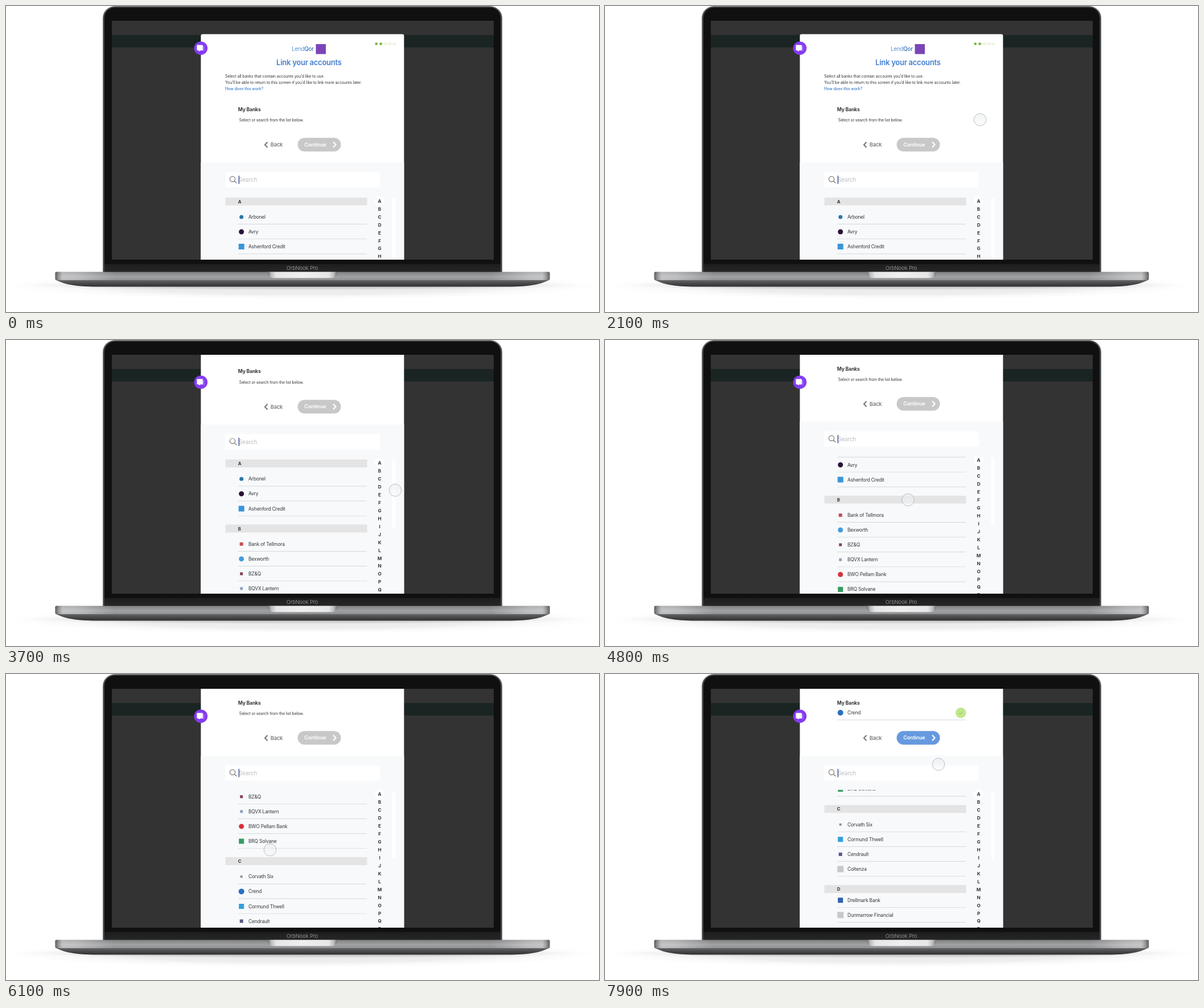
Animation of 1042 by 538 pixels, one loop 8000 ms. Source, as an HTML page with a canvas:

```html
<!DOCTYPE html>
<html lang="en">
<head>
<meta charset="utf-8">
<title>Link your accounts</title>
<style>
  html, body { margin: 0; width: 100%; height: 100%; overflow: hidden; background: #fff; }
  canvas { display: block; width: 1042px; height: 538px; }
</style>
</head>
<body>
<canvas id="stage"></canvas>
<script>
const W = 1042, H = 538, LOOP = 8000, STEP = 100;
const canvas = document.getElementById('stage');
const ctx = canvas.getContext('2d');
const dpr = window.devicePixelRatio || 1;
canvas.width = W * dpr;
canvas.height = H * dpr;

const INK = '#333639';
const ROW = 26.1;
const TRACKING = -0.02;
const PICKED = 'Crend';
const PICK_TIME = 7100;

// Each bank: name, icon colour, icon shape, icon size
const sections = [
  { letter: 'A', gap: 27.3, banks: [
    ['Arbonel', '#2b78a8', 'circle', 7],
    ['Avry', '#2a1238', 'circle', 9],
    ['Ashenford Credit', '#3a96d8', 'square', 10]] },
  { letter: 'B', gap: 27.3, banks: [
    ['Bank of Tellmora', '#c4505a', 'square', 6],
    ['Bexworth', '#3f9fdc', 'circle', 9],
    ['BZ&Q', '#85404f', 'square', 5],
    ['BQVX Lantern', '#93a4bb', 'square', 5],
    ['BWO Pellam Bank', '#d8323a', 'circle', 9],
    ['BRQ Solvane', '#379c62', 'square', 9]] },
  { letter: 'C', gap: 27.3, banks: [
    ['Corvath Six', '#8b9095', 'square', 4],
    [PICKED, '#2a70c0', 'circle', 10],
    ['Cormund Thwell', '#349fdc', 'square', 9],
    ['Cendrault', '#555a88', 'square', 6],
    ['Coltenza', '#c6c8ca', 'square', 11]] },
  { letter: 'D', gap: 19.7, banks: [
    ['Drellmark Bank', '#2d63b0', 'square', 9],
    ['Dunmarrow Financial', '#c6c8ca', 'square', 11]] }
];
const pickedBank = sections[2].banks[1];

const clamp = v => Math.max(0, Math.min(1, v));

// Smooth curve through [time, value] points, without overshoot
function track(keys, t) {
  const last = keys.length - 1;
  if (t <= keys[0][0]) return keys[0][1];
  if (t >= keys[last][0]) return keys[last][1];
  const slope = i => (keys[i + 1][1] - keys[i][1]) / (keys[i + 1][0] - keys[i][0]);
  const tangent = i => {
    if (i === 0 || i === last) return 0;
    const a = slope(i - 1), b = slope(i);
    return a * b <= 0 ? 0 : 2 * a * b / (a + b);
  };
  let i = 0;
  while (t >= keys[i + 1][0]) i++;
  const span = keys[i + 1][0] - keys[i][0];
  const u = (t - keys[i][0]) / span, u2 = u * u, u3 = u2 * u;
  return (2 * u3 - 3 * u2 + 1) * keys[i][1] + (u3 - 2 * u2 + u) * span * tangent(i)
    + (3 * u2 - 2 * u3) * keys[i + 1][1] + (u3 - u2) * span * tangent(i + 1);
}

const pageScroll = t => 131.5 * (1 - Math.cos(Math.PI * clamp((t - 2140) / 1780))) / 2;
const listKeys = [[4200, 0], [4800, 46], [6100, 190.4], [6900, 282]];
const pointerX = [[2100, 659], [3100, 675.3], [3700, 684], [4000, 646], [4800, 532.5], [6100, 464], [6900, 440], [7100, 440], [7900, 586]];
const pointerY = [[2100, 199.8], [3100, 221.3], [3700, 264], [4000, 271], [4800, 281], [6100, 309], [6900, 291], [7100, 291], [7900, 158.8]];

function rect(x, y, w, h, fill, r = 0) {
  ctx.fillStyle = fill;
  ctx.beginPath();
  ctx.roundRect(x, y, w, h, r);
  ctx.fill();
}

function circle(x, y, r, fill, stroke, width = 1) {
  ctx.beginPath();
  ctx.arc(x, y, r, 0, Math.PI * 2);
  if (fill) { ctx.fillStyle = fill; ctx.fill(); }
  if (stroke) { ctx.strokeStyle = stroke; ctx.lineWidth = width; ctx.stroke(); }
}

function line(points, color, width) {
  ctx.beginPath();
  points.forEach(([x, y]) => ctx.lineTo(x, y));
  ctx.strokeStyle = color;
  ctx.lineWidth = width;
  ctx.stroke();
}

// y is the middle of the capitals
function text(str, x, y, size, color = INK, weight = 400, align = 'left') {
  ctx.font = `${weight} ${size}px Inter, "Liberation Sans", sans-serif`;
  ctx.letterSpacing = `${size * TRACKING}px`;
  ctx.fillStyle = color;
  ctx.textAlign = align;
  ctx.fillText(str, x, y + size * 0.36);
  return ctx.measureText(str).width;
}

// Stops are [offset, colour]
function gradient(x0, y0, x1, y1, stops) {
  const g = ctx.createLinearGradient(x0, y0, x1, y1);
  stops.forEach(([at, color]) => g.addColorStop(at, color));
  return g;
}

const mirror = stops => [...stops, ...stops.map(([at, color]) => [1 - at, color]).reverse()];

function clipped(x, y, w, h, draw) {
  ctx.save();
  ctx.beginPath();
  ctx.rect(x, y, w, h);
  ctx.clip();
  draw();
  ctx.restore();
}

function shadow(y, rx, ry, alpha) {
  ctx.save();
  ctx.translate(521, y);
  ctx.scale(1, ry / rx);
  const g = ctx.createRadialGradient(0, 0, rx * 0.6, 0, 0, rx);
  g.addColorStop(0, `rgba(0,0,0,${alpha})`);
  g.addColorStop(0.5, `rgba(0,0,0,${alpha * 0.35})`);
  g.addColorStop(1, 'rgba(0,0,0,0)');
  circle(0, 0, rx, g);
  ctx.restore();
}

function drawLaptop() {
  shadow(492, 521, 24, 0.07);
  shadow(491, 500, 9, 0.12);
  rect(170, 0.3, 702, 468, '#626567', [21, 21, 0, 0]);
  rect(171.5, 1.5, 699, 467, '#3d4041', [20, 20, 0, 0]);
  rect(173, 2.8, 696, 466, '#101010', [18, 18, 0, 0]);
  rect(173, 453.5, 696, 14, gradient(0, 453, 0, 467, [[0, '#1d1d1d'], [1, '#262626']]));
  text('OrbNook Pro', 520.5, 460.8, 9.4, '#8b8b8b', 400, 'center');

  // Base
  ctx.beginPath();
  ctx.moveTo(86.5, 481);
  ctx.bezierCurveTo(100, 489, 122, 493.5, 160, 493.5);
  ctx.lineTo(882, 493.5);
  ctx.bezierCurveTo(920, 493.5, 942, 489, 955.5, 481);
  ctx.closePath();
  ctx.fillStyle = gradient(0, 481, 0, 493.5, [[0, '#6a6b6d'], [0.5, '#4b4b4d'], [1, '#303031']]);
  ctx.fill();
  rect(86.5, 467.5, 869, 14.5, gradient(0, 467, 0, 482, [[0, '#7f8082'], [0.6, '#a0a1a3'], [1, '#8f9092']]), [2, 2, 3, 3]);
  const shine = gradient(86.5, 0, 955.5, 0, mirror([
    [0, 'rgba(50,50,50,.6)'], [0.015, 'rgba(255,255,255,.4)'], [0.045, 'rgba(255,255,255,.35)'], [0.12, 'rgba(255,255,255,0)']]));
  rect(86.5, 467.5, 869, 14.5, shine, [2, 2, 3, 3]);

  // Opening notch
  rect(460, 467.5, 122, 10.7, gradient(460, 0, 582, 0, mirror([
    [0, '#6f7072'], [0.05, '#bcbdbf'], [0.12, '#e6e6e7'], [0.5, '#efeff0']])), [0, 0, 9, 9]);
}

function drawHeader() {
  const w = text('Lend', 502, 75.3, 9.8, '#5592d2', 400);
  text('Qor', 502 + w, 75.3, 9.8, '#3a72b8', 500);
  rect(544.5, 67, 17.5, 17.5, '#7b45b8');
  text('Link your accounts', 532.3, 99.6, 13, '#447fd0', 600, 'center');

  line([[650, 66.5], [683, 66.5]], '#dcecc0', 0.7);
  for (let i = 0; i < 5; i++) {
    const x = 650.7 + i * 7.95;
    if (i < 2) circle(x, 66.5, 2.3, '#74b33f');
    else circle(x, 66.5, 1.9, '#fff', '#cfe5ab', 0.8);
  }

  text('Select all banks that contain accounts you’d like to use.', 385, 123.6, 7);
  text('You’ll be able to return to this screen if you’d like to link more accounts later.', 385, 134.7, 7);
  text('How does this work?', 385, 145.8, 7, '#3c7dc6', 500);
}

function drawBank([name, color, shape, size], y) {
  if (shape === 'circle') circle(413.7, y, size / 2, color);
  else rect(413.7 - size / 2, y - size / 2, size, size, color);
  text(name, 426, y, 8.4);
  rect(408, y + 12.2, 226, 0.9, '#d5d8da');
}

function drawMyBanks(picked) {
  text('My Banks', 407.8, 182, 8.6, INK, 700);
  if (picked) {
    drawBank(pickedBank, 199.6);
    circle(625.2, 199.8, 9.2, '#c1e78d');
    line([[621.8, 200], [624.2, 202.4], [628.6, 197.5]], '#7db548', 1);
  } else {
    text('Select or search from the list below.', 409.8, 200.6, 7);
  }
  line([[459.5, 239.2], [455, 244], [459.5, 248.8]], '#7c7c7c', 2.2);
  text('Back', 464.8, 244.1, 9.3, '#7c7c7c', 600);
  rect(512.5, 231.8, 76, 24, picked ? '#6699df' : '#c8c8c8', 12);
  text('Continue', 524.3, 243.4, 9, '#fff', 600);
  line([[575, 239], [579.5, 243.8], [575, 248.6]], '#fff', 2.2);
}

function drawList(scroll, picked) {
  let y = 343.6 - scroll;
  for (const { letter, gap, banks } of sections) {
    rect(385.5, y - 6.9, 249, 13.8, '#e4e4e5');
    text(letter, 407.7, y + 0.2, 7.8, INK, 700);
    y += gap;
    for (const bank of banks) {
      if (picked && bank === pickedBank) continue;
      drawBank(bank, y);
      y += ROW;
    }
    y += 35 - ROW;
  }
}

function drawPage(t) {
  const picked = t >= PICK_TIME;
  ctx.save();
  ctx.translate(0, -pageScroll(t));
  rect(342.4, 49.5, 357, 560, '#fff', 3);
  rect(342.4, 275, 357, 340, '#f7f9fb');
  drawHeader();
  drawMyBanks(picked);

  rect(385, 292, 272, 27, '#fff', 3);
  circle(398, 304.2, 4.6, null, '#757575', 1.2);
  line([[401.3, 307.5], [405.2, 311.2]], '#757575', 1.3);
  text('Search', 408.8, 305.8, 10.1, '#bcbec1');
  rect(408.6, 298.3, 1.5, 14.6, '#4353a0');

  clipped(342, 335.2, 300, 300, () => drawList(track(listKeys, t), picked));

  circle(656.5, 342.7, 8.5, '#fff');
  for (let i = 0; i < 26; i++) {
    text(String.fromCharCode(65 + i), 656.5, 342.8 + i * 13.95, 8.2, INK, 700, 'center');
  }
  rect(678.3, 337.5, 6, 119, '#fff', 3);
  ctx.restore();
}

function drawChat() {
  circle(342.3, 74.2, 11.8, '#843cf0');
  rect(339.5, 70.5, 9, 8.5, '#a06af5', 1);
  rect(335.4, 68.6, 10.4, 9.4, '#fff', 1);
  ctx.beginPath();
  ctx.moveTo(337.5, 77.5);
  ctx.lineTo(342, 77.5);
  ctx.lineTo(339.7, 79.8);
  ctx.fill();
}

function drawPointer(t) {
  const alpha = clamp((t - 1800) / 200);
  if (!alpha) return;
  ctx.save();
  ctx.globalAlpha = alpha;
  const x = track(pointerX, t), y = track(pointerY, t);
  const fill = gradient(0, y - 11, 0, y + 11, [[0, 'rgba(230,235,236,.55)'], [1, 'rgba(248,250,250,.55)']]);
  circle(x, y, 10.8, fill, 'rgba(160,163,166,.75)', 0.9);
  ctx.restore();
}

function draw(t) {
  ctx.setTransform(dpr, 0, 0, dpr, 0, 0);
  rect(0, 0, W, H, '#fff');
  drawLaptop();
  clipped(186, 26, 671, 420, () => {
    rect(186, 26, 671, 420, '#333');
    rect(186, 51, 671, 22, '#1a2423');
    drawPage(t);
    drawChat();
    drawPointer(t);
  });
}

let start = null;
function tick(now) {
  if (start === null) start = now;
  const t = (now - start) % LOOP;
  draw(Math.floor(t / STEP) * STEP);
  requestAnimationFrame(tick);
}
requestAnimationFrame(tick);
</script>
</body>
</html>
```
